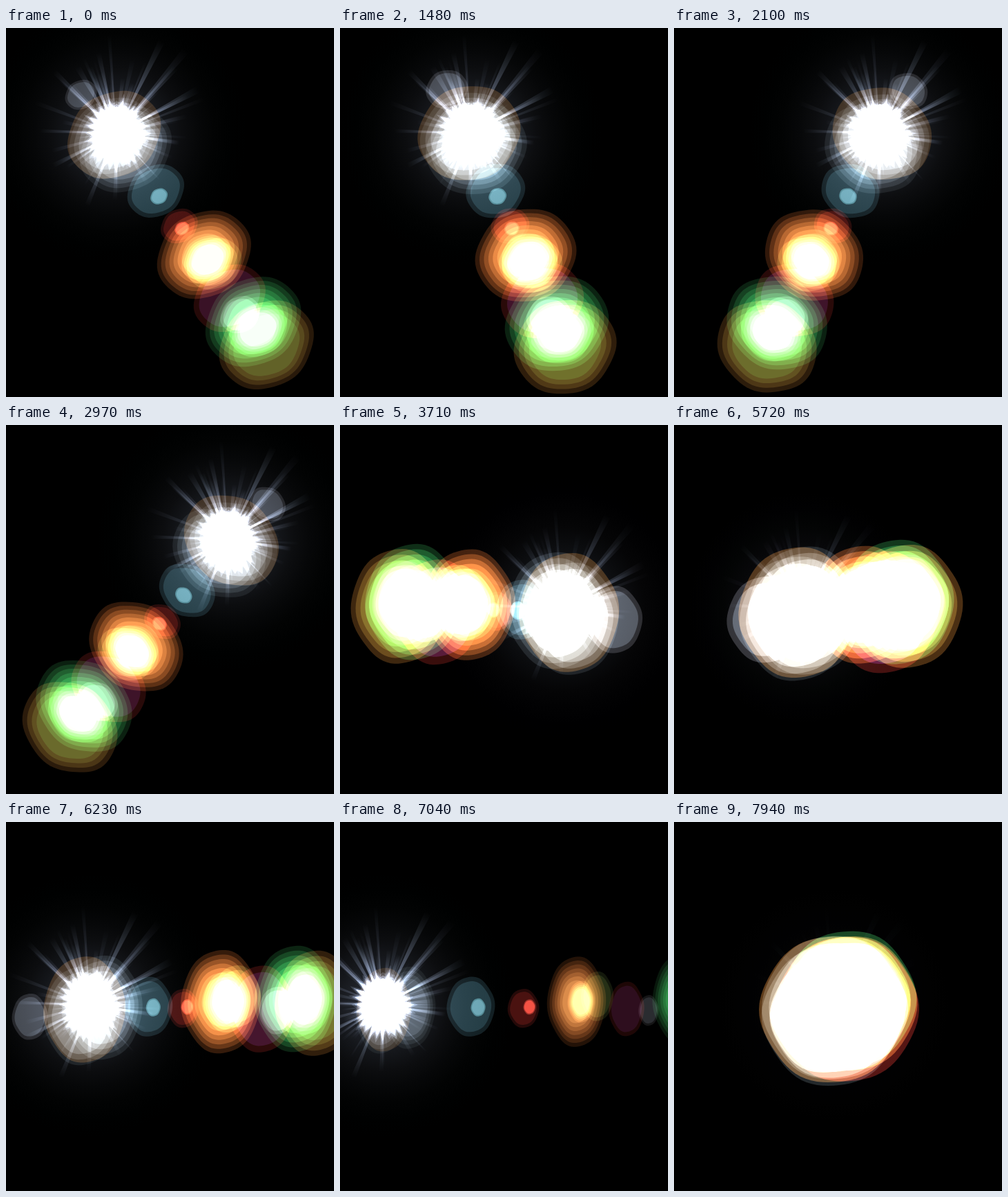
An HTML page with a canvas that plays this animation: 475 by 533 pixels, repeating every 8 s.

```html
<!DOCTYPE html>
<html>
<head>
<meta charset="utf-8">
<title>Lens flare</title>
<style>
html, body { margin: 0; width: 100%; height: 100%; overflow: hidden; background: #000; }
canvas { display: block; }
</style>
</head>
<body>
<canvas id="stage" width="475" height="533"></canvas>
<script>
const ctx = document.getElementById('stage').getContext('2d');
const LOOP = 8000, CX = 239, CY = 267;

// Runs of steps about 100 ms apart: first, last
const runs = [
  [1300, 1300], [1480, 2200], [2300, 2390], [2880, 3580], [3710, 3710],
  [4520, 5240], [5350, 6120], [6230, 6750], [7040, 7740], [7850, 7940]
];
// Light: time, x
const path = [
  [0, 160], [1300, 173], [1480, 190], [2097, 298], [2390, 322], [3710, 322],
  [4520, 311], [6230, 122], [6750, 50], [7040, 62], [7940, 231]
];
const tint = {
  ash: '#1a1a1c', mist: '#0f1112', haze: '#1a1d20', amber: '#28190a',
  teal: '#121e22', glint: '#2d4b4e', red: '#250908', ember: '#55201a',
  rust: '#2c1609', sand: '#221c12', cream: '#282a20', plum: '#14091e',
  green: '#0a1e0f', olive: '#181e0e', moss: '#09180a'
};
for (const k in tint) tint[k] = tint[k].match(/\w\w/g).map(h => parseInt(h, 16));

// Ghosts: place on axis, y shift, radius, shrink, layers, outer tint, inner tint
const ghosts = [
  [1.78, 16, 85, .52, 2, 'ash', 'haze'],
  [1.08, 5, 108, .25, 1, 'amber', 'amber'],
  [1.12, 14, 104, .27, 3, 'mist', 'haze'],
  [.86, 2, 106, .25, 4, 'mist', 'haze'],
  [.28, 0, 43, 0, 2, 'teal', 'teal'],
  [.22, 1, 13, 0, 2, 'glint', 'haze'],
  [-.15, 2, 28, 0, 2, 'red', 'red'],
  [-.2, 0, 11, 0, 2, 'ember', 'ember'],
  [-.62, -8, 93, .17, 7, 'rust', 'sand'],
  [-.7, -8, 72, .33, 5, 'sand', 'cream'],
  [-.82, -16, 62, .24, 2, 'olive', 'olive'],
  [-1.13, 2, 108, .36, 2, 'red', 'plum'],
  [-1.33, 4, 58, .35, 2, 'ash', 'haze'],
  [-1.55, -13, 100, .2, 6, 'green', 'green'],
  [-1.8, -7, 99, .2, 4, 'amber', 'moss'],
  [-1.68, -12, 85, .35, 5, 'green', 'haze']
];

let seed = 7;
const rand = () => (seed = seed * 16807 % 2147483647) / 2147483647;
const rays = Array.from({length: 110}, () => ({
  a: rand() * 2 * Math.PI, len: 50 + 75 * rand() * rand(), w: .012 + .03 * rand(), s: .3 + .7 * rand()
}));
const spikes = Array.from({length: 56}, (_, i) => i % 2 ? 34 + 5 * rand() : 38 + 13 * rand());

const mix = (a, b, u) => a + u * (b - a);
const rgb = c => `rgb(${c.map(Math.round)})`;
const cool = v => rgb([v * .88, v * .97, v * 1.15]);

function lastStep(t) {
  const run = runs.filter(r => r[0] <= t).pop();
  if (!run) return 0;
  const [a, b] = run, gap = (b - a) / Math.round((b - a) / 100) || 1;
  return Math.min(b, a + Math.floor((t - a) / gap + .001) * gap);
}

function lightAt(t) {
  const i = path.findIndex(p => p[0] > t);
  const y = t < 2880 ? 154 : mix(167, 266, Math.min(1, (t - 2880) / 830));
  if (i < 0) return [path[path.length - 1][1], y];
  const [t0, x0] = path[i - 1], [t1, x1] = path[i];
  return [mix(x0, x1, (t - t0) / (t1 - t0)), y];
}

function blob(x, y, r, ratio, turn, color) {
  ctx.save();
  ctx.translate(x, y);
  ctx.rotate(turn);
  ctx.scale(ratio, 1);
  ctx.beginPath();
  for (let a = 0; a < 6.28; a += .08) {
    const q = r * (1 + .013 * Math.cos(6 * a + 1) + .008 * Math.cos(4 * a));
    ctx.lineTo(q * Math.cos(a), q * Math.sin(a));
  }
  ctx.fillStyle = color;
  ctx.fill();
  ctx.restore();
}

// Light fading from the centre as a power of the distance
function fade(r, level, power) {
  const g = ctx.createRadialGradient(0, 0, 0, 0, 0, r);
  for (let p = 0; p <= 1; p += .125) g.addColorStop(p, cool(level * (1 - p) ** power));
  return g;
}

function star(scale, color) {
  ctx.beginPath();
  spikes.forEach((r, i) => {
    const a = i / spikes.length * 2 * Math.PI;
    ctx.lineTo(scale * r * Math.cos(a), scale * r * Math.sin(a));
  });
  ctx.fillStyle = color;
  ctx.fill();
}

function drawLight(x, y, ratio, power) {
  ctx.save();
  ctx.translate(x, y);
  ctx.fillStyle = fade(190, 66 * power, 2.3);
  ctx.fillRect(-190, -190, 380, 380);
  for (const {a, len, w, s} of rays) {
    const far = len * (1.12 - .22 * Math.sin(a));
    ctx.fillStyle = fade(far, 125 * s * power, 1.1);
    ctx.beginPath();
    ctx.moveTo(0, 0);
    ctx.lineTo(far * Math.cos(a - w), far * Math.sin(a - w));
    ctx.lineTo(far * Math.cos(a + w), far * Math.sin(a + w));
    ctx.fill();
  }
  ctx.scale(ratio, 1);
  star(1.22, cool(34));
  star(1.1, cool(66));
  star(1, cool(200));
  ctx.restore();
}

function draw(t) {
  const [x, y] = lightAt(lastStep(t));
  const dx = x - CX, dy = y - CY, d = Math.hypot(dx, dy);
  const turn = Math.atan2(dy, dx), ratio = 1 - .2 * Math.abs(dx) / 100;
  const gain = Math.max(.8, 1 + (138 - d) / 100);

  ctx.globalCompositeOperation = 'source-over';
  ctx.fillStyle = '#000';
  ctx.fillRect(0, 0, 475, 533);
  ctx.globalCompositeOperation = 'lighter';

  for (const [k, shift, size, shrink, n, outer, inner] of ghosts) {
    const r = size * (1 - shrink * d / 100);
    if (r < 8) continue;
    const p = k * (1 - shrink * .005 * (d - 110));
    for (let i = 0; i < n; i++) {
      const u = n > 1 ? i / (n - 1) : 0;
      const c = tint[outer].map((v, j) => mix(v, tint[inner][j], u) * (shrink ? gain : 1));
      blob(CX + p * dx, CY + p * dy + shift, r * (1 - u * .075 * n),
        shrink ? ratio : Math.max(.8, ratio), turn, rgb(c));
    }
  }
  drawLight(x, y - 2, Math.max(.85, ratio), Math.min(1, .15 + d / 125));
}

function frame(now) {
  draw(now % LOOP);
  requestAnimationFrame(frame);
}
requestAnimationFrame(frame);
</script>
</body>
</html>
```
